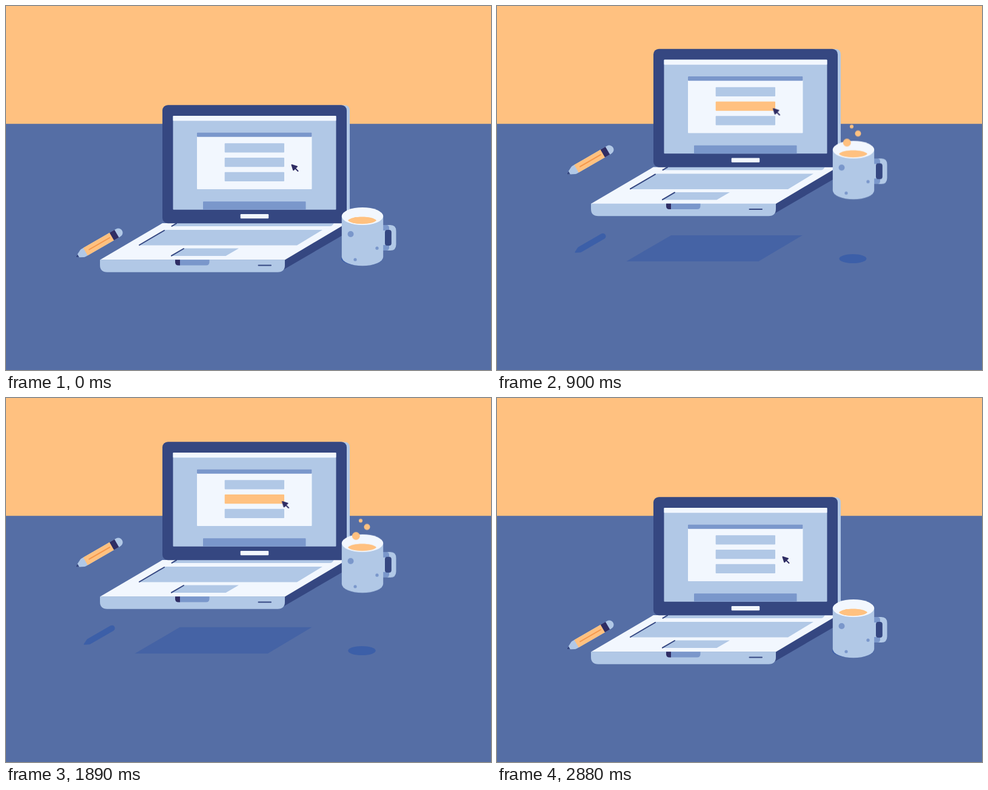
An HTML page that plays this animation: 800x600 px, repeating every 3.48 s.

```html
<!DOCTYPE html>
<html lang="en">
<head>
<meta charset="utf-8">
<title>Floating desk</title>
<style>
  /* Heights above the desk, in px */
  @property --laptop { syntax: '<number>'; inherits: true; initial-value: 0; }
  @property --mug { syntax: '<number>'; inherits: true; initial-value: 0; }
  @property --pencil { syntax: '<number>'; inherits: true; initial-value: 0; }

  :root {
    --pale: #f2f7fe; --light: #b1c8e6; --mid: #7a97cb;
    --dark: #354781; --ink: #2f2d64; --orange: #ffc180;
    --fall: cubic-bezier(.33, 0, .67, .13);
  }
  html, body { margin: 0; width: 100%; height: 100%; overflow: hidden; background: #556ea5; }
  svg { display: block; width: 100%; height: 100%; }

  svg, .drop, .cursor, .choice {
    animation: 3480ms cubic-bezier(.37, 0, .63, 1) infinite;
  }
  svg { animation-name: laptop, mug, pencil; }

  .pale { fill: var(--pale); }
  .light { fill: var(--light); }
  .mid { fill: var(--mid); }
  .dark { fill: var(--dark); }
  .ink { fill: var(--ink); }
  .orange { fill: var(--orange); }
  .line { fill: none; stroke: var(--dark); stroke-width: 2; stroke-linecap: round; }

  .laptop { transform: translateY(calc(var(--laptop) * -1px)); }
  .mug { transform: translateY(calc(var(--mug) * -1px)); }
  .pencil { transform: translateY(calc(var(--pencil) * -1px)); }

  .laptop-shadow {
    fill: #4563a5;
    transform-origin: 358.5px 399.5px;
    transform: scale(calc(1 - var(--laptop) * .0029));
  }
  .mug-shadow {
    fill: #3c5fa8;
    transform-origin: 587px 416.5px;
    transform: scale(calc(1 - var(--mug) * .0031));
  }
  .pencil-shadow {
    fill: #3c5fa8;
    transform-origin: 154px 391px;
    transform: scale(calc(1 - var(--pencil) * .00246));
  }

  .cursor { animation-name: point; }
  .choice { animation-name: choose; }
  .a { animation-name: drop-a; }
  .b { animation-name: drop-b; }
  .c { animation-name: drop-c; }

  @keyframes laptop {
    0%, 7.18% { --laptop: 0; }
    18.1% { --laptop: 97; }
    31.32% { --laptop: 90; }
    42.53% { --laptop: 101; }
    54.02% { --laptop: 91; }
    66.09% { --laptop: 97; animation-timing-function: var(--fall); }
    80.46%, 100% { --laptop: 0; }
  }
  @keyframes mug {
    0%, 8.91% { --mug: 0; }
    19.83% { --mug: 112.5; }
    33.05% { --mug: 106; }
    44.25% { --mug: 115; }
    55.46% { --mug: 107; }
    66.95% { --mug: 111.5; animation-timing-function: var(--fall); }
    80.89%, 100% { --mug: 0; }
  }
  @keyframes pencil {
    0%, 13.65% { --pencil: 0; }
    24.71% { --pencil: 137; }
    35.34% { --pencil: 131; }
    46.55% { --pencil: 139.2; }
    57.76% { --pencil: 135; }
    68.39% { --pencil: 135.3; animation-timing-function: var(--fall); }
    82.61%, 100% { --pencil: 0; }
  }
  @keyframes drop-a {
    0%, 12.36% { transform: translateY(0); }
    18.97% { transform: translateY(-21.5px); }
    33.62% { transform: translateY(-17.5px); }
    44.83% { transform: translateY(-27px); }
    56.03% { transform: translateY(-19.5px); }
    67.82% { transform: translateY(-22.5px); animation-timing-function: var(--fall); }
    81.9%, 100% { transform: translateY(0); }
  }
  @keyframes drop-b {
    0%, 12.93% { transform: translateY(0); }
    22.41% { transform: translateY(-34.5px); }
    35.34% { transform: translateY(-29.5px); }
    45.98% { transform: translateY(-37.5px); }
    57.47% { transform: translateY(-33px); }
    68.39% { transform: translateY(-33.5px); animation-timing-function: var(--fall); }
    81.03%, 100% { transform: translateY(0); }
  }
  @keyframes drop-c {
    0%, 14.66% { transform: translateY(0); }
    24.43% { transform: translateY(-45.5px); }
    35.34% { transform: translateY(-38.5px); }
    46.55% { transform: translateY(-46.7px); }
    57.76% { transform: translateY(-43.5px); }
    68.97% { transform: translateY(-42.5px); animation-timing-function: var(--fall); }
    81.9%, 100% { transform: translateY(0); }
  }
  @keyframes point {
    0%, 4.02% { transform: translateX(0); }
    8.62%, 66.09% { transform: translateX(-15.5px); }
    71.55%, 100% { transform: translateX(0); }
  }
  @keyframes choose {
    0%, 7.03% { fill: var(--light); }
    7.04%, 67.96% { fill: var(--orange); }
    67.97%, 100% { fill: var(--light); }
  }
</style>
</head>
<body>
<svg viewBox="0 0 800 600">
  <defs>
    <path id="pencil-shape" d="M.6 -1 L12 -6.8 Q13 -7.3 15 -7.3 H80.5 A7.3 7.3 0 0 1 80.5 7.3 H15 Q13 7.3 12 6.8 L.6 1 Q-.6 0 .6 -1Z"/>
    <clipPath id="pencil-clip"><use href="#pencil-shape"/></clipPath>
    <clipPath id="above-coffee">
      <path d="M558 200 H617 V353.5 H611 C604 361 571 361 564 353.5 H558Z"/>
    </clipPath>
  </defs>

  <rect class="orange" width="800" height="194.5"/>
  <rect y="194.5" width="800" height="405.5" fill="#556ea5"/>

  <path class="laptop-shadow" d="M160 429 L261 370 H557 L458 429Z"/>
  <ellipse class="mug-shadow" cx="587" cy="416.5" rx="34" ry="11.4"/>
  <g class="pencil-shadow">
    <use href="#pencil-shape" transform="translate(115.5 414) rotate(-30)"/>
  </g>

  <g class="pencil">
    <g transform="translate(115.5 414) rotate(-30)" clip-path="url(#pencil-clip)">
      <rect class="light" x="-2" y="-9" width="92" height="18"/>
      <rect class="dark" x="-2" y="-9" width="6.5" height="18"/>
      <rect class="orange" x="18" y="-9" width="51" height="18"/>
      <rect class="ink" x="68" y="-9" width="9.5" height="18"/>
      <path d="M25 0 H64" stroke="#f5974a" stroke-width="2" stroke-linecap="round"/>
    </g>
  </g>

  <g class="laptop">
    <path class="light" d="M530 163.5 H558 Q567 163.5 567 172.5 V349 Q567 358 558 358 H530Z"/>
    <path class="dark" d="M562 358 V374 L457 435 L455 418Z"/>
    <path class="pale" d="M155 418.5 L258 358 H562 L460 418.5Z"/>
    <path class="light" d="M155 418.3 H460 V427 Q460 438.7 448 438.7 H167 Q155 438.7 155 427Z"/>
    <path class="light" d="M280 357 H541 Q539 363 534 363 H273Z"/>
    <path class="light" d="M262 369 H522 L480 394.5 H220Z"/>
    <path class="light" d="M293 399.5 H384 L362.5 412 H272.5Z"/>
    <path class="line" d="M273.5 362.8 L281 358.5 M220 394 L261 370 M273 411.7 L293 400"/>
    <path class="mid" d="M279 418.3 H335.5 V422 Q335.5 427.5 330 427.5 H284.5 Q279 427.5 279 422Z"/>
    <path class="ink" d="M279 418.3 H287 V427.5 H284.5 Q279 427.5 279 422Z"/>
    <path class="line" d="M416.5 427.5 H437"/>

    <rect class="dark" x="258" y="163.2" width="304" height="195" rx="9"/>
    <rect class="light" x="275.5" y="181" width="269" height="154.7" rx="1"/>
    <rect class="pale" x="275.5" y="181" width="269" height="8.3" rx="1"/>
    <rect class="pale" x="315" y="208.5" width="189.5" height="93.5" rx="1"/>
    <rect class="mid" x="315" y="208.5" width="189.5" height="7.2" rx="1"/>
    <rect class="light" x="360.7" y="226.2" width="98.3" height="15.3" rx="1"/>
    <rect class="light choice" x="360.7" y="250" width="98.3" height="15.3" rx="1"/>
    <rect class="light" x="360.7" y="273.8" width="98.3" height="15.3" rx="1"/>
    <path class="mid" d="M325 335.7 V323 Q325 322.3 326 322.3 H493.5 Q494.5 322.3 494.5 323 V335.7Z"/>
    <rect class="pale" x="386.7" y="343" width="46.5" height="7.2" rx="1.2"/>
    <g class="cursor" fill="#2f2d64" stroke="#2f2d64" stroke-width="2" stroke-linecap="round" stroke-linejoin="round">
      <path d="M471.5 262 L480 264.6 L474.2 270.4Z"/>
      <path d="M476.5 267 L481.5 272"/>
    </g>
  </g>

  <g class="mug">
    <path class="light" d="M620 361 H634 Q643.5 361 643.5 371 V393 Q643.5 403 634 403 H620Z"/>
    <path class="mid" d="M620 361 H627 Q632 361 632 366 V370 H620Z M620 403 H627 Q632 403 632 398 V394 H620Z"/>
    <rect class="dark" x="625" y="369" width="10.8" height="26" rx="4"/>
    <path class="light" d="M553.8 346.5 V413.5 A34.2 14.8 0 0 0 622.2 413.5 V346.5Z"/>
    <ellipse class="pale" cx="588" cy="346.5" rx="34.2" ry="14.6"/>
    <g class="mid">
      <circle cx="568.5" cy="376" r="5"/>
      <circle cx="612" cy="399.2" r="2.6"/>
      <circle cx="576" cy="418" r="2.6"/>
    </g>
    <path class="orange" d="M564 353.5 C570 345.5 605 345.5 611 353.5 C604 361 571 361 564 353.5Z"/>
    <g class="orange" clip-path="url(#above-coffee)">
      <circle class="drop a" cx="577.3" cy="354.5" r="6.5"/>
      <circle class="drop b" cx="595.5" cy="353.5" r="5"/>
      <circle class="drop c" cx="585" cy="353.5" r="3.1"/>
    </g>
  </g>
</svg>
</body>
</html>
```
